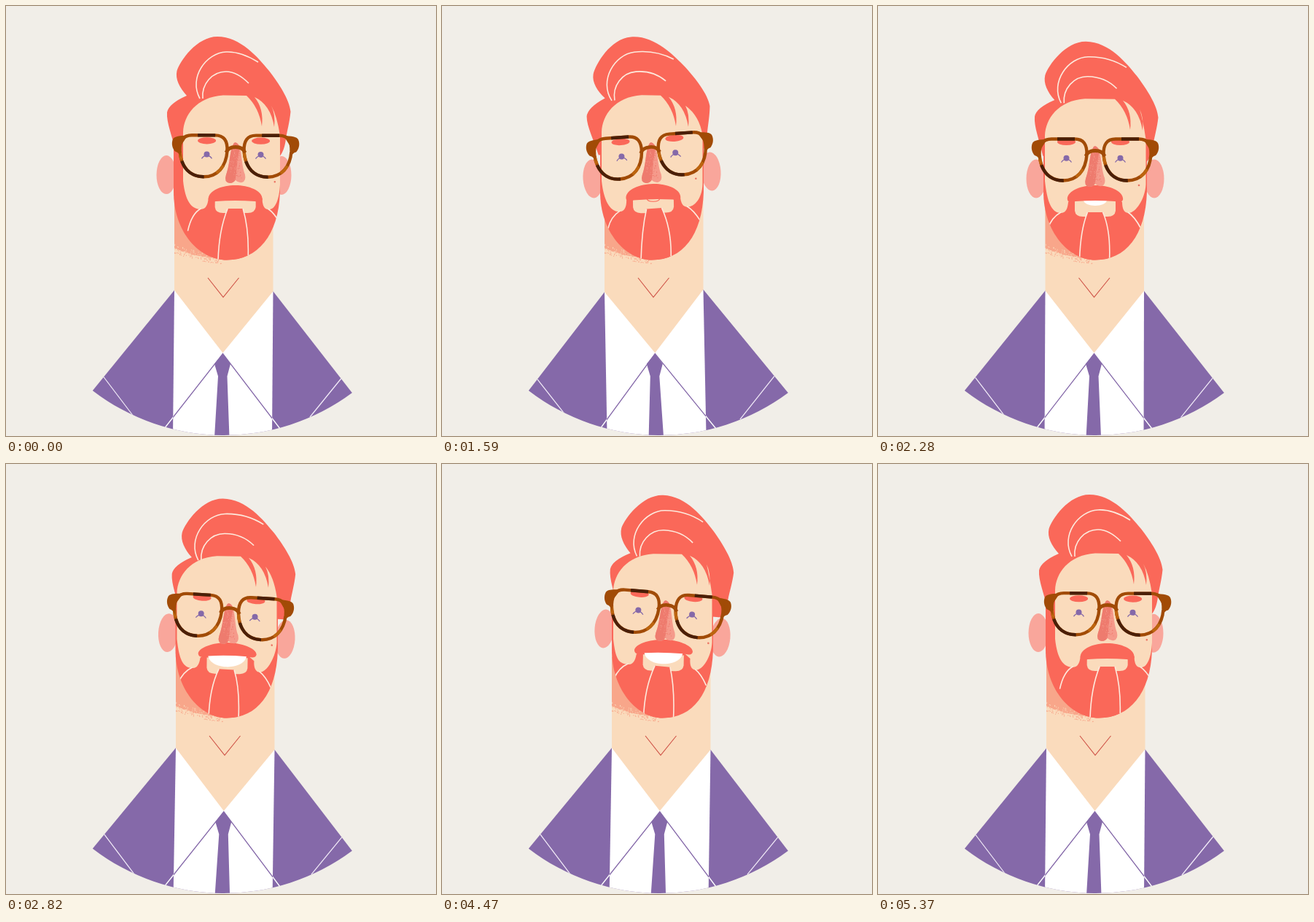
Write an HTML page with a canvas that moves like this. It is 590 px wide and 590 px high and loops after 5400 ms.

```html
<!DOCTYPE html>
<html lang="en">
<head>
<meta charset="utf-8">
<title>Smiling man</title>
<style>
html, body { margin: 0; width: 100%; height: 100%; overflow: hidden; background: #f1eee8; }
canvas { display: block; width: 590px; height: 590px; }
</style>
</head>
<body>
<canvas id="stage"></canvas>
<script>
const LOOP = 5400, STEP = 30, SIZE = 590;
const C = {
  bg: '#f1eee8', hair: '#fa6859', skin: '#fadbbc', suit: '#8569a9', ear: '#f9a69b',
  shade: '#f8a68a', line: '#fdeadd', rim: '#a14b06', rimDark: '#4a1f08', rimLight: '#bd650f',
  nose: '#f59a8b', noseDark: '#ee7b6e', neckline: '#cf5347'
};

// Pose tracks: one value per time in `times`.
const times = [0, 330, 630, 1590, 1740, 1980, 2280, 2820, 4470, 4620, 5130, 5400];
const tracks = {
  faceX:  [315, 303, 291.5, 286, 286, 289, 298, 307, 308.5, 308.6, 315, 315],
  faceY:  [206, 211, 210, 206, 205.5, 198, 211, 210, 206, 205.7, 205.3, 206],
  tilt:   [.3, -1.5, -3.3, -4, -4, -3, 0, 3.5, 4.8, 4.8, .3, .3],
  hairX:  [0, -10, -22, -25.5, -25.5, -20, -5.5, 7, 11, 11, 0, 0],
  hairY:  [0, 5, 1.3, -.5, -.8, -8, 6.8, 5.5, 1, .8, -.9, 0],
  hairR:  [0, -2, -4.5, -4.5, -4.5, -3, .8, .5, 2, 2, 0, 0],
  jawL:   [230, 224, 218, 217, 217, 219, 227, 232.5, 233, 233, 230, 230],
  jawR:   [376, 368, 360, 359, 359, 361, 369, 373, 372, 372, 376, 376],
  skinL:  [243, 232, 220, 219, 219, 221, 229, 234.5, 235, 235, 243, 243],
  sway:   [0, -3.5, -7, -8, -8, -6, -1.5, 2, 2, 2, 0, 0],
  fringe: [330, 318, 305, 300, 300, 307, 325, 322, 329, 329, 330, 330],
  chin:   [312, 304, 297.5, 294, 294, 295, 297.5, 299, 297.5, 297.5, 312, 312],
  smile:  [0, .08, .15, .15, .15, .2, .4, 1, 1, 1, 0, 0]
};

const clamp = v => Math.max(0, Math.min(1, v));

// Slope of a monotone cubic at key i, flat at extremes and ends.
function slope(v, i) {
  if (i === 0 || i === v.length - 1) return 0;
  const h0 = times[i] - times[i - 1], h1 = times[i + 1] - times[i];
  const d0 = (v[i] - v[i - 1]) / h0, d1 = (v[i + 1] - v[i]) / h1;
  if (d0 * d1 <= 0) return 0;
  const a = 2 * h1 + h0, b = h1 + 2 * h0;
  return (a + b) / (a / d0 + b / d1);
}

function sample(v, t) {
  let i = 0;
  while (i < times.length - 2 && t >= times[i + 1]) i++;
  const h = times[i + 1] - times[i], u = (t - times[i]) / h, w = 1 - u;
  return v[i] * (1 + 2 * u) * w * w + v[i + 1] * u * u * (3 - 2 * u)
    + h * u * w * (slope(v, i) * w - slope(v, i + 1) * u);
}

function poseAt(t) {
  const p = {};
  for (const k in tracks) p[k] = sample(tracks[k], t);
  p.rot = p.tilt * Math.PI / 180;
  p.turn = clamp((p.skinL - p.jawL - 2) / 11);
  p.skinR = p.jawR - 1.5 * (1 - p.turn);
  return p;
}

let seed = 7;
const rand = () => (seed = (seed * 16807) % 2147483647) / 2147483647;
const scatter = (n, f) => Array.from({ length: n }, f);
const neckDots = scatter(190, () => {
  const x = rand() * 64;
  return [x, 334 + 14 * Math.sin(x / 64 * 1.5) + (rand() - .6) * 9];
});
const noseDots = scatter(110, () => {
  const y = -12 + rand() * 44;
  return [(rand() + rand() - 1) * 8 + 1, y];
});

const shapes = {
  hair: 'M248 123C238 112 232 100 234.5 89C239 75 262 42 290 42C322 42 346 71 361 89C374 106 389 128 390.5 145C389 160 386 170 384 182C383 192 380 201 375 207L233 200C228 178 220 160 221 146Q223 134 248 123Z',
  lens: 'M-16 -28.5L16 -28.5C28 -28.5 33 -21 32.5 -7C31 15 19 28.5 0 28.5C-19 28.5 -31 15 -32.5 -7C-33 -21 -28 -28.5 -16 -28.5Z',
  arm: 'M-66 -28C-76 -28 -84 -27 -86 -23C-89 -16 -86 -9 -83 -6Q-78 -5 -75 2L-75 -14Z',
  bridge: 'M-13 -5Q-10 -12.5 0 -12.5Q10 -12.5 13 -5',
  nose: 'M-2 -18C-8 -10 -7 10 -13 26Q-16 36 -8 37Q-3 37 0 33Q4 37 9 36Q15 34 13 25C8 12 9 -8 4 -16Q0 -20 -2 -18Z',
  noseSide: 'M-2 -18C-8 -10 -7 10 -13 26Q-16 36 -8 37Q-2 37 0 32C2 15 3 0 6 -12Q2 -21 -2 -18Z',
  eyelid: 'M-7 5.5Q-4 1.2 0 1.2Q4 1.2 7 5.5',
  mouthSkin: 'M-28 56L28 56L28 70Q27 78 17 78L-17 78Q-27 78 -28 70Z'
};
for (const k in shapes) shapes[k] = new Path2D(shapes[k]);

const canvas = document.getElementById('stage');
const ctx = canvas.getContext('2d');
const dpr = window.devicePixelRatio || 1;
canvas.width = canvas.height = SIZE * dpr;

function fill(path, color) { ctx.fillStyle = color; ctx.fill(path); }

function stroke(path, color, width) {
  ctx.strokeStyle = color;
  ctx.lineWidth = width;
  ctx.stroke(path);
}

function poly(closed, ...pts) {
  const path = new Path2D();
  pts.forEach(p => path.lineTo(...p));
  if (closed) path.closePath();
  return path;
}

function oval(x, y, rx, ry, color, rot = 0) {
  const path = new Path2D();
  path.ellipse(x, y, rx, ry, rot, 0, 7);
  fill(path, color);
}

function dots(list, x, y, size, color) {
  ctx.fillStyle = color;
  for (const [dx, dy] of list) ctx.fillRect(x + dx, y + dy, size, size);
}

function group(draw) { ctx.save(); draw(); ctx.restore(); }

// Turns the drawing around the point (0, y).
function rotateAbout(y, angle) {
  ctx.translate(0, y);
  ctx.rotate(angle);
  ctx.translate(0, -y);
}

function drawBody({ sway: n }) {
  const left = [231 + n, 390 - .3 * n], right = [366.5 + n, 391.5 + .3 * n];
  const mid = 297.5 + .65 * n, low = .3 * n;
  const suit = new Path2D();
  suit.moveTo(...left);
  suit.lineTo(119, 527.5);
  suit.arc(299, 294, 295, Math.atan2(233.5, -180), Math.atan2(237, 176), true);
  suit.lineTo(...right);
  suit.closePath();
  const shirt = poly(true, left, [229 + low, 592], [365 + low, 592], right);
  const collar = poly(false, [217, 580], [mid, 477], [376, 580]);

  group(() => {
    fill(suit, C.suit);
    ctx.clip(suit);
    stroke(collar, '#fff', 1.3);
    stroke(poly(false, [134 + .4 * n, 509 - .4 * n], [175 + n, 563 + .6 * n]), '#f5effa', 1.2);
    stroke(poly(false, [460 + .5 * n, 511 + .4 * n], [417 + n, 564 - .4 * n]), '#f5effa', 1.2);
    fill(shirt, '#fff');
    group(() => { ctx.clip(shirt); stroke(collar, C.suit, 1.3); });
    fill(poly(true, [mid, 477], [mid + 10.5, 491], [mid + 6, 508], [306.5 + low, 592],
      [286 + low, 592], [mid - 6.5, 508], [mid - 11.5, 491]), C.suit);
  });

  fill(poly(true, [left[0], 200], left, [mid, 476], right, [right[0], 200]), C.skin);
  const x = left[0];
  fill(new Path2D(`M${x} 265L${x} 332Q${x + 25} 344 ${x + 64} 347L${x + 64} 265Z`), C.shade);
  group(() => {
    ctx.beginPath();
    ctx.rect(x, 260, 80, 100);
    ctx.clip();
    dots(neckDots.slice(0, 110), x, 1.5, 1.1, C.shade);
    dots(neckDots.slice(110), x, -2, 1, C.skin);
  });
  stroke(poly(false, [277 + n, 373], [298 + n, 399.5], [319.5 + n, 373]), C.neckline, 1.1);
}

function drawHair(p) {
  const k = 9 * p.turn;
  const strands = new Path2D(`M${257 + k} 127C${241 + k} 98 ${266 + k} 64 ${293 + k} 63Q322 62 346 77`
    + `M${261 + k} 127C${259 + k} 107 ${274 + k} 90 ${293 + k} 90Q317 90 333 106`);
  group(() => {
    ctx.translate(300 + p.hairX, 110 + p.hairY);
    ctx.rotate(p.hairR * Math.PI / 180);
    ctx.translate(-300, -110);
    fill(shapes.hair, C.hair);
    stroke(strands, C.line, 1.6);
  });
}

function drawHead(p) {
  const { jawL: l, jawR: r, skinL, skinR, fringe: fx, chin } = p;
  const cos = Math.cos(p.rot), sin = Math.sin(p.rot);
  // Face coordinates to stage coordinates, as a path string.
  const at = (x, y) => `${p.faceX + x * cos - y * sin} ${p.faceY + x * sin + y * cos} `;
  const inFace = draw => group(() => {
    ctx.translate(p.faceX, p.faceY);
    ctx.rotate(p.rot);
    draw(p);
  });

  const earY = p.faceY + 26, lift = 72 * sin;
  oval(l - 10, earY - lift, 13.5, 26.5, C.ear, p.rot);
  oval(r + 10 - 8 * p.turn, earY + lift, 13.5, 26.5, C.ear, p.rot);

  const cx = (l + r) / 2;
  const jaw = new Path2D(`M${l} 176L${l} 255C${l} 310 ${l + 35} 348.5 ${cx} 348.5`
    + `C${cx + 42} 348.5 ${r - 2} 315 ${r} 255L${r} 176Z`);
  fill(jaw, C.hair);
  drawHair(p);

  const top = 123 + .7 * p.hairY;
  const f = (x, y) => `${fx + x} ${top + y} `;
  fill(new Path2D(`M${skinL} 240L${skinL} ${top + 50}`
    + `C${skinL + 1} ${top + 27} ${skinL + 18} ${top + 2} ${skinL + 55} ${top - .5}L${f(0, 0)}`
    + `Q${f(17, 16)}${f(21, 42)}Q${f(24, 18)}${f(11, 2)}Q${f(33, 12)}${f(38, 43)}`
    + `Q${f(40, 26)}${f(34, 14)}Q${skinR - 4} ${top + 28} ${skinR} ${top + 55}L${skinR} 245`
    + `C${skinR - 1} 265 ${at(55, 74)}${at(45, 73)}Q${at(37, 72)}${at(37, 58)}`
    + `L${at(20, 45)}L${at(-20, 45)}L${at(-37, 58)}Q${at(-38, 72)}${at(-46, 73)}`
    + `C${at(-60, 74)}${skinL + 3} 268 ${skinL} 240Z`), C.skin);

  inFace(drawMouth);

  const half = 21;
  const leftSide = `M${at(-10.5, 72)}Q${chin - half + 1} 308 ${chin - half} 350`;
  const rightSide = `Q${chin + half + 1} 308 ${at(10.5, 72)}`;
  group(() => {
    ctx.clip(jaw);
    fill(new Path2D(`${leftSide}L${chin + half - 1} 350${rightSide}Z`), C.hair);
    stroke(new Path2D(`${leftSide}M${chin + half - 1} 350${rightSide}`
      + `M${at(-47, 72)}Q${at(-60, 79)}${at(-65, 95 + 8 * p.turn)}`
      + `M${at(45, 72)}Q${at(54, 78)}${at(62, 93)}`), C.line, 1.6);
  });

  inFace(drawFeatures);
  inFace(drawGlasses);
}

function drawMouth({ smile: s, rot }) {
  const up = 5 * clamp(s / .4), wide = 37 + 3 * s, low = 62 - up - 3 * clamp((s - .4) / .6);
  rotateAbout(55, -.75 * rot);
  fill(shapes.mouthSkin, C.skin);

  const w = 9 + 17.5 * clamp((s - .15) / .6), depth = 3 + 13 * clamp((s - .15) / .85);
  const white = clamp((s - .15) / .15), base = low + depth * 1.25;
  const grin = new Path2D(`M${-w} ${low - 2}C${-w + 1} ${base} ${w - 1} ${base} ${w} ${low - 2}`);
  ctx.globalAlpha = white;
  fill(grin, '#fff');
  ctx.globalAlpha = clamp(s / .15) * (1 - white);
  stroke(grin, C.hair, 1.1);
  ctx.globalAlpha = 1;

  const t = 40 - up;
  fill(new Path2D(`M${-wide} ${low - 3}C${-wide} ${t + 7} -18 ${t} 0 ${t}C18 ${t} ${wide} ${t + 7} ${wide} ${low - 3}`
    + `Q${wide - 1} ${low + 3} 27 ${low}Q0 ${low - 2} -27 ${low}Q${-wide + 1} ${low + 4} ${-wide} ${low - 3}Z`), C.hair);
}

function drawFeatures({ smile, turn, rot }) {
  const browY = -21 - 3.5 * clamp(smile / .4);
  for (const x of [-39.5, 34.5]) {
    oval(x, browY, 12.5, 4.6, C.hair);
    group(() => {
      ctx.translate(x, -2);
      oval(0, -.3, 4, 4, C.suit);
      stroke(shapes.eyelid, C.suit, 1.3);
    });
  }
  oval(60 - 6 * turn, 35, 1.3, 1.3, '#ec7464');

  group(() => {
    rotateAbout(25, -.8 * rot);
    fill(shapes.nose, C.nose);
    fill(shapes.noseSide, C.noseDark);
    ctx.clip(shapes.nose);
    dots(noseDots.slice(0, 60), 0, 0, 1, C.noseDark);
    dots(noseDots.slice(60), -3, 0, .9, C.nose);
  });
}

function drawGlasses() {
  for (const side of [-1, 1]) {
    group(() => {
      ctx.scale(side, 1);
      fill(shapes.arm, C.rim);
    });
    group(() => {
      ctx.translate(44 * side, 0);
      stroke(shapes.lens, C.rim, 4.4);
      ctx.lineDashOffset = -8;
      ctx.setLineDash([24, 84, 40, 400]);
      stroke(shapes.lens, C.rimDark, 4.4);
      ctx.lineDashOffset = -84;
      ctx.setLineDash([14, 60, 10, 400]);
      stroke(shapes.lens, C.rimLight, 4);
    });
  }
  stroke(shapes.bridge, C.rim, 4.8);
}

function render(now) {
  const pose = poseAt(Math.floor((now % LOOP) / STEP) * STEP);
  ctx.setTransform(dpr, 0, 0, dpr, 0, 0);
  ctx.fillStyle = C.bg;
  ctx.fillRect(0, 0, SIZE, SIZE);
  drawBody(pose);
  drawHead(pose);
}

const start = performance.now();
function tick() {
  render(performance.now() - start);
  requestAnimationFrame(tick);
}
tick();
</script>
</body>
</html>
```
